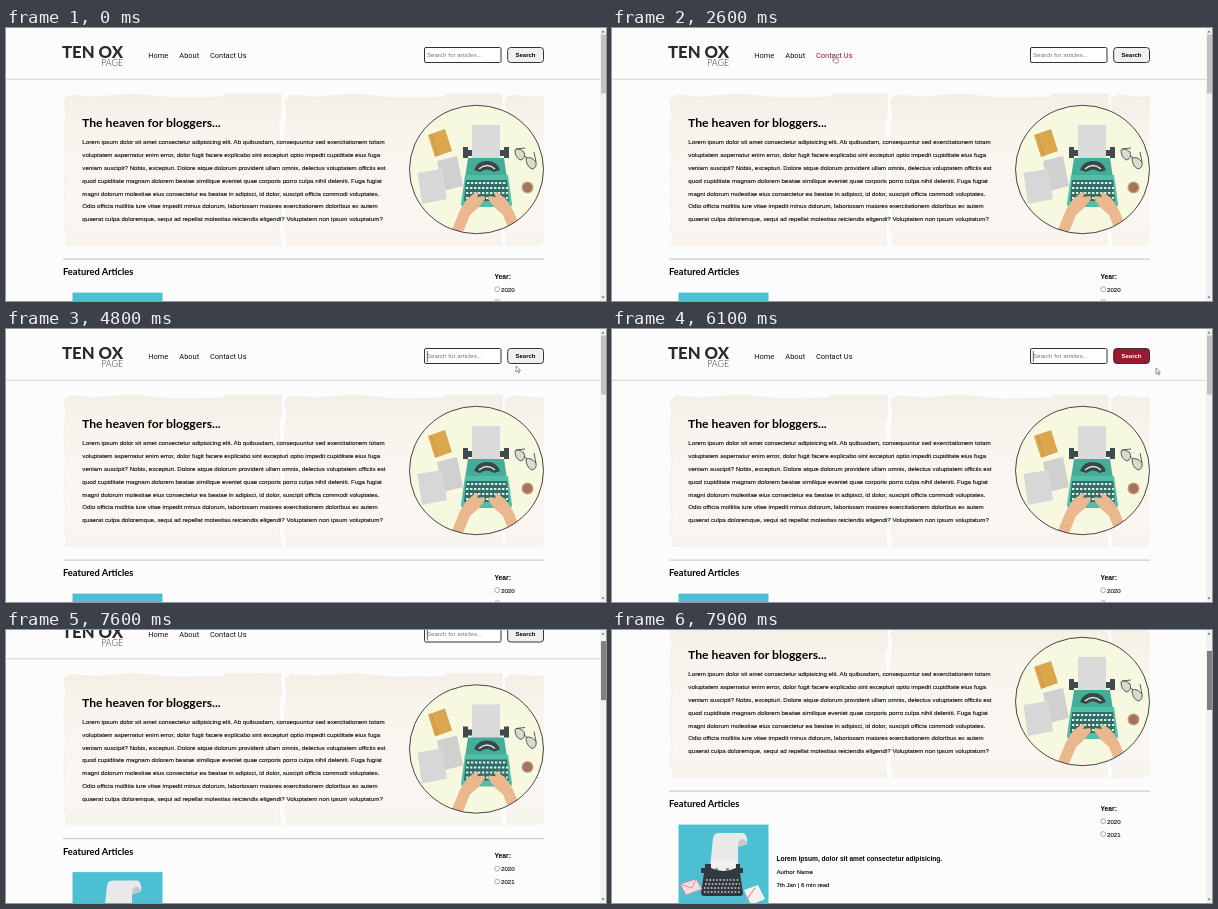
An HTML page that plays this animation: 600x273 px, repeating every 8 s.

```html
<!DOCTYPE html>
<html lang="en">
<head>
<meta charset="utf-8">
<title>Blog home page</title>
<style>
  @property --scroll { syntax: '<length>'; inherits: true; initial-value: 0px; }

  html, body { margin: 0; width: 100%; height: 100%; overflow: hidden; background: #fdfcfd; }
  svg { display: block; width: 600px; height: 273px; overflow: hidden; animation: scroll 8s step-end infinite; }
  text { font-family: "Liberation Sans", Arial, sans-serif; font-size: 6.18px; fill: #161616; }
  .bold { font-weight: 700; fill: #000; }
  .title { font-family: Lato, sans-serif; font-weight: 700; fill: #000; }
  .medium text { stroke: #161616; stroke-width: .14; }
  .logo { font-family: Lato, sans-serif; font-size: 16.7px; font-weight: 800; fill: #2a2a2a; }
  .sublogo { font-family: Lato, sans-serif; font-size: 8.8px; font-weight: 300; fill: #333; }
  .nav text { font-family: Roboto, sans-serif; font-size: 7.44px; fill: #111; }

  .page { transform: translateY(calc(var(--scroll) * -1)); }
  .thumb { transform: translateY(calc(var(--scroll) * .206)); }
  .thumb rect { fill: #c1c1c1; animation: thumb 8s step-end infinite; }

  .nav .home { animation: home 8s step-end infinite; }
  .nav .about { animation: about 8s step-end infinite; }
  .nav .contact { animation: contact 8s step-end infinite; }
  .caret { opacity: 0; animation: focus 8s step-end infinite; }
  .button rect { fill: #f0f0f0; animation: button 8s linear infinite; }
  .button text { animation: label 8s linear infinite; }

  .cursor { animation: move 8s linear infinite; }
  .cursor path { fill: #fff; stroke: #444; stroke-width: .55; stroke-linejoin: round; }
  .arrow { opacity: 0; animation: arrow 8s step-end infinite; }
  .hand { opacity: 0; animation: hand 8s step-end infinite; }
  .beam { opacity: 0; animation: beam 8s step-end infinite; }

  @keyframes scroll {
    0% { --scroll: 0px; }
    93.75% { --scroll: 8px; }
    95% { --scroll: 22.5px; }
    96.25% { --scroll: 39px; }
    97.5% { --scroll: 55px; }
    98.75%, 100% { --scroll: 70px; }
  }
  @keyframes thumb { 0% { fill: #c1c1c1; } 88.75% { fill: #a8a8a8; } 92.5%, 100% { fill: #808080; } }
  @keyframes home { 0% { fill: #111; } 10% { fill: #a3122a; } 18.75%, 100% { fill: #111; } }
  @keyframes about { 0% { fill: #111; } 21.25% { fill: #a3122a; } 23.75%, 100% { fill: #111; } }
  @keyframes contact { 0% { fill: #111; } 28.75% { fill: #a3122a; } 37.5%, 100% { fill: #111; } }
  @keyframes focus { 0% { opacity: 0; } 52.5%, 100% { opacity: 1; } }
  @keyframes button {
    0%, 65% { fill: #f0f0f0; }
    67.5%, 77% { fill: #9c1a31; }
    79%, 100% { fill: #f0f0f0; }
  }
  @keyframes label {
    0%, 65% { fill: #000; }
    67.5%, 77% { fill: #fff; }
    79%, 100% { fill: #000; }
  }
  @keyframes move {
    0% { transform: translate(58px, 66px); animation-timing-function: step-end; }
    1.25% { transform: translate(58px, 66px); animation-timing-function: steps(9, start); }
    12.5% { transform: translate(152px, 28px); animation-timing-function: step-end; }
    17.5% { transform: translate(152px, 28px); animation-timing-function: steps(9, start); }
    28.75% { transform: translate(230px, 33px); animation-timing-function: steps(2, start); }
    31.25% { transform: translate(222px, 27.5px); animation-timing-function: step-end; }
    36.25% { transform: translate(222px, 27.5px); animation-timing-function: steps(9, start); }
    47.5% { transform: translate(425px, 30px); animation-timing-function: steps(6, start); }
    55% { transform: translate(452px, 27px); animation-timing-function: step-end; }
    60% { transform: translate(510px, 37px); animation-timing-function: step-end; }
    61.25% { transform: translate(510px, 37px); animation-timing-function: steps(6, start); }
    68.75% { transform: translate(520px, 28px); animation-timing-function: step-end; }
    73.75% { transform: translate(520px, 28px); animation-timing-function: steps(3, start); }
    77.5% { transform: translate(544px, 39px); animation-timing-function: steps(6, start); }
    85% { transform: translate(590px, 22px); animation-timing-function: steps(5, start); }
    91.25%, 100% { transform: translate(602px, 24px); }
  }
  @keyframes hand {
    0% { opacity: 0; }
    10% { opacity: 1; } 18.75% { opacity: 0; }
    21.25% { opacity: 1; } 23.75% { opacity: 0; }
    28.75% { opacity: 1; } 37.5% { opacity: 0; }
    65% { opacity: 1; } 75%, 100% { opacity: 0; }
  }
  @keyframes beam { 0% { opacity: 0; } 46.25% { opacity: 1; } 60%, 100% { opacity: 0; } }
  @keyframes arrow {
    0% { opacity: 0; } 1.25% { opacity: 1; }
    10% { opacity: 0; } 18.75% { opacity: 1; }
    21.25% { opacity: 0; } 23.75% { opacity: 1; }
    28.75% { opacity: 0; } 37.5% { opacity: 1; }
    46.25% { opacity: 0; } 60% { opacity: 1; }
    65% { opacity: 0; } 75%, 100% { opacity: 1; }
  }
</style>
</head>
<body>
<svg viewBox="0 0 600 273">
  <defs>
    <linearGradient id="cream" x2="0" y2="1">
      <stop offset="0" stop-color="#f4efe6"/>
      <stop offset=".25" stop-color="#f8f5ef"/>
      <stop offset=".8" stop-color="#faf7f3"/>
      <stop offset="1" stop-color="#f7f3ed"/>
    </linearGradient>
    <clipPath id="hero"><rect x="57" y="65" width="481" height="153" rx="6"/></clipPath>
    <clipPath id="disc"><ellipse cx="470.5" cy="141.5" rx="67" ry="64"/></clipPath>
    <path id="sheet" fill="url(#cream)" stroke="#f2ece3" stroke-width=".8"
      d="M1 71 8 67 32 69 70 66 112 70 160 69 163 66H218V88L215 95 218 122 216 150 218 178 216 204 218 219H2L4 208 1 204 3 188 1 160 3 132 1 104 3 86Z"/>
  </defs>

  <g class="page">
    <text class="logo" x="56" y="30">TEN OX</text>
    <text class="sublogo" x="117" y="38.3" text-anchor="end">PAGE</text>
    <g class="nav">
      <text class="home" x="142.3" y="29.6">Home</text>
      <text class="about" x="173.3" y="29.6">About</text>
      <text class="contact" x="204" y="29.6">Contact Us</text>
    </g>
    <rect x="418.5" y="19.5" width="76.5" height="15" rx="1.5" fill="#fff" stroke="#333"/>
    <text x="421" y="28.6" style="fill:#757575">Search for articles...</text>
    <path class="caret" d="M421.3 22V33" stroke="#222" stroke-width=".7"/>
    <g class="button">
      <rect x="501.7" y="19.5" width="35.8" height="15" rx="3" stroke="#333"/>
      <text class="bold" x="519.5" y="28.9" text-anchor="middle" style="font-size:6px">Search</text>
    </g>
    <path d="M0 51.3H594" stroke="#d8d4d2"/>

    <g clip-path="url(#hero)">
      <use href="#sheet" x="57"/>
      <use href="#sheet" x="278"/>
      <use href="#sheet" x="498"/>
    </g>
    <text class="title" x="76" y="99" style="font-size:12.2px">The heaven for bloggers...</text>
    <g id="intro" class="medium"></g>

    <g clip-path="url(#disc)">
      <rect x="403" y="77" width="135" height="129" fill="#f6f8e0"/>
      <path d="M422 107 439 101 446 123 429 129Z" fill="#dca64e"/>
      <path d="M425 106 432 128" stroke="#c8913d" stroke-width=".8"/>
      <path d="M431 133 451 128 457 158 437 163Z" fill="#d0d0d0"/>
      <path d="M411.5 145 436 141 441 171 416 176Z" fill="#d7d7d7"/>
      <path d="M457 119h5v3h36v-3h5v11h-5v-2h-36v2h-5Z" fill="#3f4b4e"/>
      <path d="M466 97H494V131H466Z" fill="#dadada"/>
      <path d="M462 130H498L501 150H459Z" fill="#43ad97"/>
      <path d="M468 142Q471 133 481 133T494 142L488 144Q481 139 474 144Z" fill="#39474a"/>
      <path d="M473 141Q481 134 489 141" fill="none" stroke="#e4eadb" stroke-width="1.5"/>
      <path d="M459 147H502L506 176Q506 179 503 179H458Q455 179 455 176Z" fill="#53bea7"/>
      <path d="M460 152H501L503 173H458Z" fill="#2f6f68"/>
      <path d="M461 155H501M460 160H502M460 165H502M460 170H502" stroke="#e0eee5" stroke-width="2.2" stroke-dasharray="2.4 1.6"/>
      <path id="arm" d="M443 209 454 182 461 171 470 164 473 165 471 169 478 168 479 171 472 180 464 187 455 209Z" fill="#eab78f"/>
      <use href="#arm" transform="matrix(-1 0 0 1 961 0)"/>
      <g fill="#d9dccd" stroke="#4a4a4c" stroke-width=".9">
        <path d="M509 122Q512 119 518 124Q520 130 515 132Q509 130 509 122ZM520 130Q525 128 530 134Q531 140 526 141Q520 138 520 130Z"/>
        <path d="M518 127 521 130M510 121 519 120M530 134 528 124" fill="none"/>
      </g>
      <circle cx="521.5" cy="159.5" r="6" fill="#c99c82"/>
      <circle cx="521.5" cy="159.5" r="4.7" fill="#a3735b"/>
    </g>
    <ellipse cx="470.5" cy="141.5" rx="67" ry="64.2" fill="none" stroke="#333" stroke-width=".9"/>

    <path d="M57 231.2H538" stroke="#cfcfd1" stroke-width="1.2"/>
    <text class="title" x="57" y="247" style="font-size:9.3px">Featured Articles</text>
    <text class="bold" x="488.5" y="250.5" style="font-size:6.7px">Year:</text>
    <g fill="#fff" stroke="#777" stroke-width=".6">
      <circle cx="491.2" cy="261.2" r="2.4"/>
      <circle cx="491.2" cy="274" r="2.4"/>
    </g>
    <g class="medium">
      <text x="495" y="263.7">2020</text>
      <text x="495" y="276.5">2021</text>
    </g>

    <rect x="66.5" y="264.6" width="90" height="90" fill="#4cbfd2"/>
    <path d="M98 308 101 278Q102 273 107 273H131Q136 274 135 284L126 287V308Z" fill="#e9e9e9"/>
    <path d="M126 287Q126 279 131 279Q134 280 135 284Z" fill="#c4c8ca"/>
    <path d="M89 308H93V304H128V308H131V313H128L131 333Q131 336 128 336H92Q89 336 89 333L92 313H89Z" fill="#32383e"/>
    <path d="M99 301H124V308Q111 314 99 308Z" fill="#f0f0ee"/>
    <path d="M103 309H106M114 309H117" stroke="#333" stroke-width="1.2"/>
    <path d="M94 320H127M93 324H128M92 328H129M92 332H129" stroke="#c9cdcf" stroke-width="1.5" stroke-dasharray="1.7 1.7"/>
    <path d="M68 324 84 319 90 329 74 335Z" fill="#f3dce2" stroke="#d47d97" stroke-width=".7"/>
    <path d="M68 324 80 328 84 319" fill="none" stroke="#d47d97" stroke-width=".8"/>
    <path d="M132 330 146 325 153 339 139 345Z" fill="#f2f2ee"/>
    <path d="M133 342 143 328" stroke="#d9908c" stroke-width="1.2"/>
    <text class="bold" x="164.5" y="301" style="font-size:6.6px">Lorem ipsum, dolor sit amet consectetur adipisicing.</text>
    <g class="medium">
      <text x="164.5" y="314.3">Author Name</text>
      <text x="164.5" y="327.2" style="font-size:6px">7th Jan | 6 min read</text>
    </g>
  </g>

  <rect x="594" width="6" height="273" fill="#f1f1f1"/>
  <path d="M595.5 4.5 597 2.5 598.5 4.5ZM595.5 268.5 597 270.5 598.5 268.5Z" fill="#666"/>
  <g class="thumb"><rect x="595" y="6.5" width="5" height="59"/></g>

  <g class="cursor">
    <g class="arrow"><path d="M0 0V6L1.5 4.7 2.5 7 3.5 6.5 2.6 4.4H4.5Z"/></g>
    <g class="hand"><path d="M0 .5Q.7-.3 1.3 .5V3L4 3.7Q4.800 4 4.5 5.2L3.8 7.5H.5L-1.7 4.7Q-1.5 3.800 0 4.8Z"/></g>
    <g class="beam"><path d="M-1.3-3H1.3M0-3V3M-1.3 3H1.3"/></g>
  </g>
</svg>
<script>
  const lines = [
    'Lorem ipsum dolor sit amet consectetur adipisicing elit. Ab quibusdam, consequuntur sed exercitationem totam',
    'voluptatem aspernatur enim error, dolor fugit facere explicabo sint excepturi optio impedit cupiditate eius fuga',
    'veniam suscipit? Nobis, excepturi. Dolore atque dolorum provident ullam omnis, delectus voluptatem officiis est',
    'quod cupiditate magnam dolorem beatae similique eveniet quae corporis porro culpa nihil deleniti. Fuga fugiat',
    'magni dolorum molestiae eius consectetur ea beatae in adipisci, id dolor, suscipit officia commodi voluptates.',
    'Odio officia mollitia iure vitae impedit minus dolorum, laboriosam maiores exercitationem doloribus ex autem',
    'quaerat culpa doloremque, sequi ad repellat molestias reiciendis eligendi? Voluptatem non ipsum voluptatum?'
  ];
  const intro = document.getElementById('intro');
  lines.forEach((line, i) => {
    const text = document.createElementNS(intro.namespaceURI, 'text');
    text.setAttribute('x', 76.3);
    text.setAttribute('y', 116.4 + 12.8 * i);
    text.textContent = line;
    intro.append(text);
  });
</script>
</body>
</html>
```
